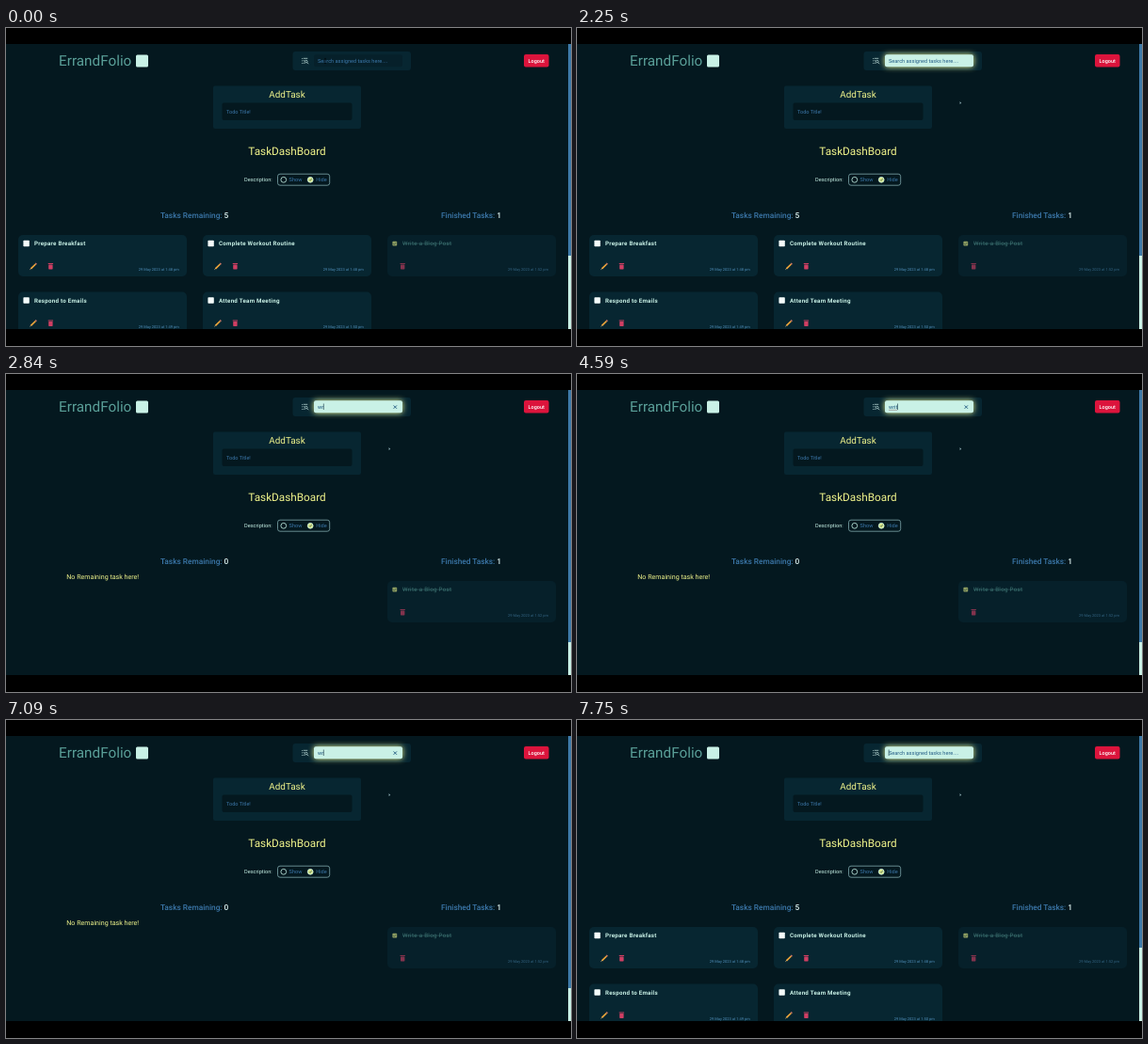
An HTML page with a canvas that plays this animation: 600x338 px, repeating every 8 s.

```html
<!DOCTYPE html>
<html lang="en">
<head>
<meta charset="utf-8">
<title>ErrandFolio</title>
<style>
  html, body { margin: 0; width: 100%; height: 100%; overflow: hidden; background: #000; }
  canvas { display: block; width: 600px; height: 338px; }
</style>
</head>
<body>
<canvas id="stage"></canvas>
<script>
const W = 600, H = 338, LOOP = 8000;
const canvas = document.getElementById('stage');
const ctx = canvas.getContext('2d');
const dpr = window.devicePixelRatio || 1;
canvas.width = W * dpr;
canvas.height = H * dpr;

const C = {
  page: '#04181f', panel: '#072631', blue: '#3c78ab', mint: '#c9f1e6', teal: '#5a9f98',
  yellow: '#f2f58c', red: '#dc143c', trash: '#cf3f63', ink: '#1c557d', date: '#4f8db8'
};

const tasks = [
  ['Prepare Breakfast', '1:48'],
  ['Complete Workout Routine', '1:48'],
  ['Respond to Emails', '1:49'],
  ['Attend Team Meeting', '1:50']
];
const TOTAL = 5;

// [start time, value] pairs; the last one reached is in force
const typed = [[0, ''], [2590, 'w'], [2750, 'wr'], [3000, 'wri'], [4590, 'writ'],
  [6590, 'wri'], [6750, 'wr'], [7170, 'w'], [7250, '']];
const caret = [[0, 0], [670, 1], [1590, 0], [2090, 1], [2250, 0], [2590, 1], [3590, 0],
  [4090, 1], [5170, 0], [5670, 1], [6170, 0], [6590, 1], [7250, 0], [7750, 1]];

const at = (track, t) => track.filter(k => k[0] <= t).pop()[1];
const clamp = x => Math.max(0, Math.min(1, x));
const ease = x => x * x * (3 - 2 * x);
const mix = (a, b, p) => a + (b - a) * p;
const blend = (a, b, p) => `rgb(${a.map((v, i) => Math.round(mix(v, b[i], p)))})`;

function box(x, y, w, h, r, fill) {
  ctx.beginPath();
  ctx.roundRect(x, y, w, h, r);
  ctx.fillStyle = fill;
  ctx.fill();
}

function line(points, color, width) {
  ctx.beginPath();
  points.forEach(p => ctx.lineTo(p[0], p[1]));
  ctx.strokeStyle = color;
  ctx.lineWidth = width;
  ctx.stroke();
}

function text(s, x, y, size, color, { weight = 400, align = 'left', gap = 0 } = {}) {
  ctx.font = `${weight} ${size}px Roboto, Arial, sans-serif`;
  ctx.letterSpacing = gap + 'px';
  ctx.textAlign = align;
  ctx.fillStyle = color;
  ctx.fillText(s, x, y);
  return ctx.measureText(s).width;
}

function radio(x, y, on) {
  ctx.beginPath();
  ctx.arc(x, y, 2.9, 0, 7);
  ctx.strokeStyle = C.mint;
  ctx.lineWidth = 0.8;
  if (on) {
    ctx.fillStyle = '#dcea8c';
    ctx.fill();
  }
  ctx.stroke();
  if (on) line([[x - 1.2, y], [x - 0.2, y + 1.1], [x + 1.5, y - 1.3]], '#35584c', 0.7);
}

function trash(x, y) {
  box(x - 2.2, y - 1.9, 4.4, 5, 0.6, C.trash);
  box(x - 2.7, y - 3.2, 5.4, 0.9, 0.2, C.trash);
}

function pencil(x, y) {
  line([[x - 2.6, y + 2.5], [x + 2.4, y - 2.3]], '#f0a63a', 1.7);
  line([[x + 2.4, y - 2.3], [x + 3.3, y - 3.1]], '#d87a6e', 1.7);
  line([[x - 3.5, y + 3.3], [x - 2.6, y + 2.5]], '#e8d2a8', 0.9);
}

const stamp = (time, x, y) =>
  text(`29 May 2023 at ${time} pm`, x, y, 4, C.date, { align: 'right' });

function card([title, time], x, y) {
  box(x, y, 179, 44, 5, C.panel);
  box(x + 5.4, y + 5.8, 6.4, 6.4, 0.8, '#f4fbfa');
  text(title, x + 17, y + 11.2, 6.2, C.mint, { weight: 700, gap: 0.25 });
  pencil(x + 16, y + 33.3);
  trash(x + 34.4, y + 33.3);
  stamp(time, x + 170.7, y + 38.3);
}

function doneCard() {
  ctx.save();
  ctx.globalAlpha = 0.62;
  box(405, 220, 179, 44, 5, C.panel);
  box(410.4, 226.8, 4.8, 4.8, 0.8, '#e3ec83');
  line([[411.4, 229.2], [412.4, 230.3], [414.3, 227.9]], '#10313a', 0.8);
  const w = text('Write a Blog Post', 421, 231.2, 6.2, C.teal, { gap: 0.3 });
  line([[421, 229.1], [421 + w, 229.1]], C.teal, 0.5);
  trash(421.2, 253.3);
  stamp('1:52', 576, 258.3);
  ctx.restore();
}

function counter(label, n, x) {
  const w = text(label + ' ', x, 202.4, 8.3, C.blue, { weight: 500 });
  text(n, x + w, 202.4, 8.3, '#e4f7f5', { weight: 500 });
}

function header() {
  text('ErrandFolio', 56, 40, 15.3, C.teal);
  box(138, 28.5, 13, 13, 1.5, C.mint);
  box(550, 28, 26.5, 13.5, 2, C.red);
  text('Logout', 563.2, 36.8, 5.5, '#fff', { align: 'center', weight: 500 });
}

function searchIcon() {
  [32.3, 34.8, 37.3].forEach((y, i) => {
    box(314, y - 0.4, 0.9, 0.9, 0, '#b5d5d2');
    line([[315.6, y], [i ? 317.3 : 320.3, y]], '#b5d5d2', 0.8);
  });
  ctx.beginPath();
  ctx.arc(318.8, 35.6, 1.3, 0, 7);
  ctx.stroke();
  line([[319.7, 36.5], [321.2, 38.2]], '#b5d5d2', 0.8);
}

function search(t, query) {
  const p = ease(clamp((t - 500) / 330));
  box(304.5, 25, 125.5, 20, 3, C.panel);
  searchIcon();
  ctx.save();
  ctx.shadowColor = `rgba(236,246,150,${p})`;
  ctx.shadowBlur = 6 * dpr * p;
  box(327, 28.3, 94, 13, 2, blend([6, 32, 42], [201, 241, 230], p));
  ctx.restore();

  let w = 0;
  if (query) {
    w = text(query, 331, 36.8, 5.6, C.ink);
    line([[411.6, 33.4], [415, 36.8]], C.ink, 0.9);
    line([[415, 33.4], [411.6, 36.8]], C.ink, 0.9);
    if (query === 'writ') line([[331, 38.3], [331 + w, 38.3]], 'rgba(120,70,80,.7)', 0.6);
  } else {
    text('Search assigned tasks here....', 331, 36.8, 5.6, blend([60, 120, 171], [36, 94, 134], p));
  }
  if (at(caret, t)) box(330.8 + w, 31.5, 0.6, 6.6, 0, '#0c2c3c');
}

function addTask() {
  box(220, 61.5, 157, 45.5, 2, C.panel);
  text('AddTask', 298.5, 74, 9.9, C.yellow, { align: 'center' });
  box(229.5, 79.5, 138, 18.5, 2, C.page);
  text('Todo Title!', 234, 91.2, 5.5, C.blue);
}

function dashboard() {
  text('TaskDashBoard', 298.5, 135, 11.75, C.yellow, { align: 'center' });
  text('Description:', 253, 163, 5.6, C.mint);
  ctx.beginPath();
  ctx.roundRect(288.5, 155.2, 55.2, 12, 2.5);
  ctx.strokeStyle = '#7fa9ad';
  ctx.lineWidth = 0.8;
  ctx.stroke();
  radio(294.8, 161.3, false);
  text('Show', 300.6, 163.2, 5.6, C.blue);
  radio(323.2, 161.3, true);
  text('Hide', 329.2, 163.2, 5.6, C.blue);
}

function lists(query) {
  const found = tasks.filter(k => k[0].toLowerCase().includes(query));
  counter('Tasks Remaining:', query ? found.length : TOTAL, 164);
  counter('Finished Tasks:', 1, 462);
  found.forEach((k, i) => card(k, 13 + 196 * (i % 2), 220 + 60.5 * Math.floor(i / 2)));
  if (!found.length) text('No Remaining task here!', 64.3, 217.8, 7.1, C.yellow);
  doneCard();
}

function scrollbar(query) {
  const end = query ? 285 : 242;
  box(597, 17, 3, end - 17, 0, '#3d79a8');
  box(597, end, 3, 320 - end, 0, C.mint);
}

function pointer(t) {
  const p = ease(clamp((t - 500) / 420));
  const q = clamp((t - 920) / 170);
  const x = mix(339, 404, p) + 3 * q, y = mix(35, 77, p) + 2.3 * q;
  if (y < 42) {
    line([[x, y - 2.6], [x, y + 2.6]], '#01080c', 0.9);
    line([[x - 1, y - 2.6], [x + 1, y - 2.6]], '#01080c', 0.6);
    line([[x - 1, y + 2.6], [x + 1, y + 2.6]], '#01080c', 0.6);
    return;
  }
  ctx.beginPath();
  [[0, -1.2], [0, 1.6], [1.5, 0.5]].forEach(d => ctx.lineTo(x + d[0] - 0.4, y + d[1]));
  ctx.fillStyle = '#9dbcc2';
  ctx.fill();
}

function draw(t) {
  const query = at(typed, t);
  ctx.setTransform(dpr, 0, 0, dpr, 0, 0);
  ctx.textRendering = 'geometricPrecision';
  ctx.fillStyle = '#000';
  ctx.fillRect(0, 0, W, H);
  ctx.save();
  ctx.beginPath();
  ctx.rect(0, 17, W, 303);
  ctx.clip();
  ctx.fillStyle = C.page;
  ctx.fillRect(0, 17, W, 303);
  header();
  search(t, query);
  addTask();
  dashboard();
  lists(query);
  scrollbar(query);
  pointer(t);
  ctx.restore();
}

const start = performance.now();
function tick() {
  draw((performance.now() - start) % LOOP);
  requestAnimationFrame(tick);
}
tick();
</script>
</body>
</html>
```
